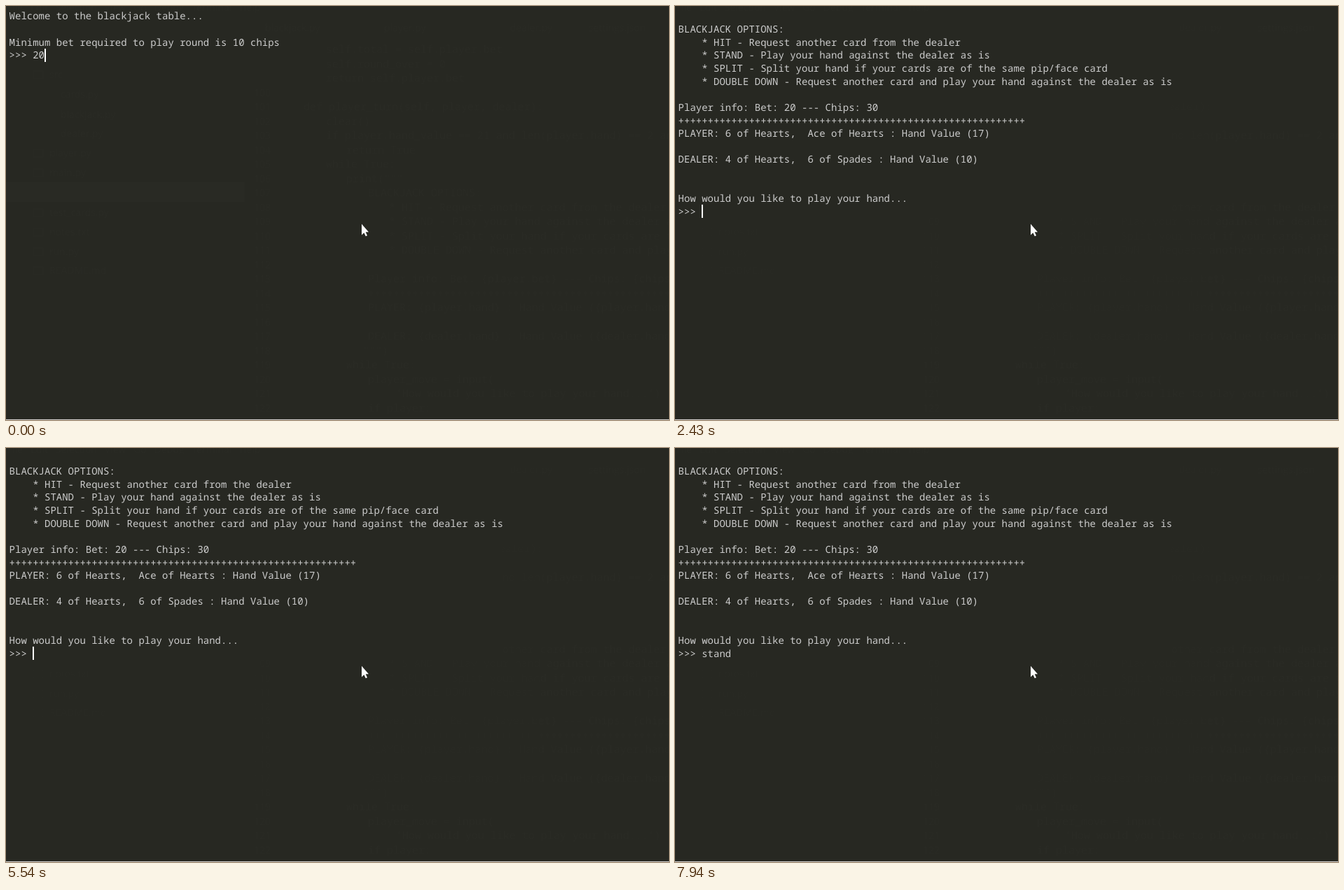
These frames come from a looping animation (947 by 592 pixels, 8000 ms). An HTML page:

```html
<!DOCTYPE html>
<html lang="en">
<head>
<meta charset="utf-8">
<title>Blackjack terminal</title>
<style>
  html, body { margin: 0; width: 100%; height: 100%; overflow: hidden; background: #272822; }
  svg { display: block; }
  text { white-space: pre; text-rendering: geometricPrecision; }
  .term text { font: 14px "Noto Sans Mono", "DejaVu Sans Mono", monospace; fill: #cccccc; }
  .ghost { fill: #fff; opacity: .009; }
  .ghost text { font: 15px "Noto Sans Mono", monospace; }
  .ghost text.ui { font: 14px "Open Sans", sans-serif; }
</style>
</head>
<body>
<svg width="947" height="592" viewBox="0 0 947 592">
  <clipPath id="rest"><path d="M0 0H947V592H0V303H709V8H0Z"/></clipPath>
  <rect width="947" height="592" fill="#272822"/>
  <g id="ghost" class="ghost"><rect y="252" width="341" height="28"/></g>
  <rect y="591" width="947" height="1" fill="#cfcccb"/>
  <g id="bet" class="term"></g>
  <g id="hand" class="term"></g>
  <rect id="caret" width="2" height="19" fill="#fff"/>
  <path d="M508 311.8V327.4L511.4 324.2L513.8 329.2L516 328.2L513.7 323.2H518Z" fill="#fff"/>
</svg>
<script>
const COL = 8.4, ROW = 18.65, LOOP = 8000;
const $ = id => document.getElementById(id);

function addText(parent, x, y, str, cls) {
  const el = document.createElementNS("http://www.w3.org/2000/svg", "text");
  el.setAttribute("x", x);
  el.setAttribute("y", y);
  if (cls) el.setAttribute("class", cls);
  el.textContent = str;
  parent.appendChild(el);
  return el;
}

function addScreen(parent, lines) {
  return lines.map((s, r) => addText(parent, 4.6, Math.round(19.3 + ROW * r), s));
}

addScreen($("bet"), [
  "Welcome to the blackjack table...",
  "",
  "Minimum bet required to play round is 10 chips",
  ">>> 20"
]);

const prompt = addScreen($("hand"), [
  "",
  "BLACKJACK OPTIONS:",
  "    * HIT - Request another card from the dealer",
  "    * STAND - Play your hand against the dealer as is",
  "    * SPLIT - Split your hand if your cards are of the same pip/face card",
  "    * DOUBLE DOWN - Request another card and play your hand against the dealer as is",
  "",
  "Player info: Bet: 20 --- Chips: 30",
  "+".repeat(59),
  "PLAYER: 6 of Hearts,  Ace of Hearts : Hand Value (17)",
  "",
  "DEALER: 4 of Hearts,  6 of Spades : Hand Value (10)",
  "",
  "",
  "How would you like to play your hand...",
  ">>> "
])[15];

// Editor window showing faintly through the terminal
const ui = [
  [2, 7, "File   Edit   Selection   View   Go   Debug   Terminal   Help"],
  [370, 36, "blackjack.py"], [540, 36, "player.py"], [720, 36, "dealer.py"], [832, 36, "settings.json"],
  [62, 103, "src"], [78, 131, "cards.py"], [78, 160, "blackjack.py"], [78, 187, "dealer.py"],
  [62, 215, "player.py"], [62, 243, "main.py"], [62, 300, "test_cards.py"],
  [62, 328, "notes.txt"], [62, 356, "run.py"], [62, 383, "README.md"]
];
const code = [
  [457, 0, "self.total = self.player.bet"],
  [457, 1, "self.round_over = 0"],
  [457, 2, "return self.player.bet"],
  [425, 4, "def player_turn(self, player, dealer):"],
  [457, 5, "clear()"],
  [457, 6, "if player.hand_value == 21 and len(player.hand) == 2 and not player.done:"],
  [486, 7, "return True"],
  [457, 8, "while True:"],
  [486, 9, "print(\"\"\""],
  [517, 10, "BLACKJACK OPTIONS:"],
  [547, 11, "* HIT - Request another card from the dealer"],
  [547, 12, "* STAND - Play your hand against the dealer as is"],
  [547, 13, "* SPLIT - Split your hand if your cards are the same"],
  [547, 14, "* DOUBLE DOWN - Request another card and play your hand"],
  [517, 16, "Player info: Bet: {player.bet} --- Chips: {chips}"],
  [517, 17, "+".repeat(59)],
  [517, 18, "PLAYER: {player.hand} : Hand Value ({player.hand_value})"],
  [517, 20, "DEALER: {dealer.hand} : Hand Value ({dealer.hand_value})"],
  [510, 21, "\"\"\")"],
  [486, 22, "while True:"],
  [517, 23, "player_move = input("],
  [557, 24, "'How would you like to play your hand...')"],
  [517, 25, "if player:"]
];
const ghost = $("ghost");
for (const [x, y, s] of ui) addText(ghost, x, y, s, "ui");
for (const [x, row, s] of code) addText(ghost, x, 67 + 20.5 * row, s);
for (let row = 3; row < 26; row++) addText(ghost, 354, 67 + 20.5 * row, 97 + row, "ui");
for (const y of [98, 210, 238, 295, 323, 351, 378]) {
  const box = document.createElementNS("http://www.w3.org/2000/svg", "path");
  box.setAttribute("d", `M39 ${y - 5}h14v11h-14z`);
  box.setAttribute("fill", "none");
  box.setAttribute("stroke", "#fff");
  ghost.appendChild(box);
}

// [start ms, caret row, caret column (-1 hides it), typed answer]
const steps = [
  [0, 3, 6], [270, 4, 0], [850, 4, -1], [1320, 4, 0], [1900, 4, -1], [2300, 4, 0],
  [2430, 15, 4, ""], [2970, 15, -1, ""], [3440, 15, 4, ""], [3980, 15, -1, ""],
  [4530, 15, 4, ""], [5140, 15, -1, ""], [5540, 15, 4, ""],
  [5820, 15, 6, "st"], [5940, 15, 7, "sta"], [6110, 15, 9, "stand"],
  [6250, 16, 0, "stand"], [6830, 16, -1, "stand"], [7380, 16, 0, "stand"], [7940, 16, -1, "stand"]
];

let shown;
function draw(time) {
  const t = time % LOOP;
  const step = steps.findLast(s => s[0] <= t) || steps[0];
  if (step === shown) return;
  shown = step;
  const [, row, col, typed] = step;
  const dealt = typed !== undefined;
  $("bet").style.display = dealt ? "none" : "";
  $("hand").style.display = dealt ? "" : "none";
  ghost.setAttribute("clip-path", dealt ? "url(#rest)" : "none");
  prompt.textContent = ">>> " + (typed || "");
  const caret = $("caret");
  caret.style.display = col < 0 ? "none" : "";
  caret.setAttribute("x", Math.round(4.6 + COL * col));
  caret.setAttribute("y", Math.floor(5.1 + ROW * row));
}

function tick() {
  draw(performance.now());
  requestAnimationFrame(tick);
}
draw(0);
requestAnimationFrame(tick);
</script>
</body>
</html>
```
